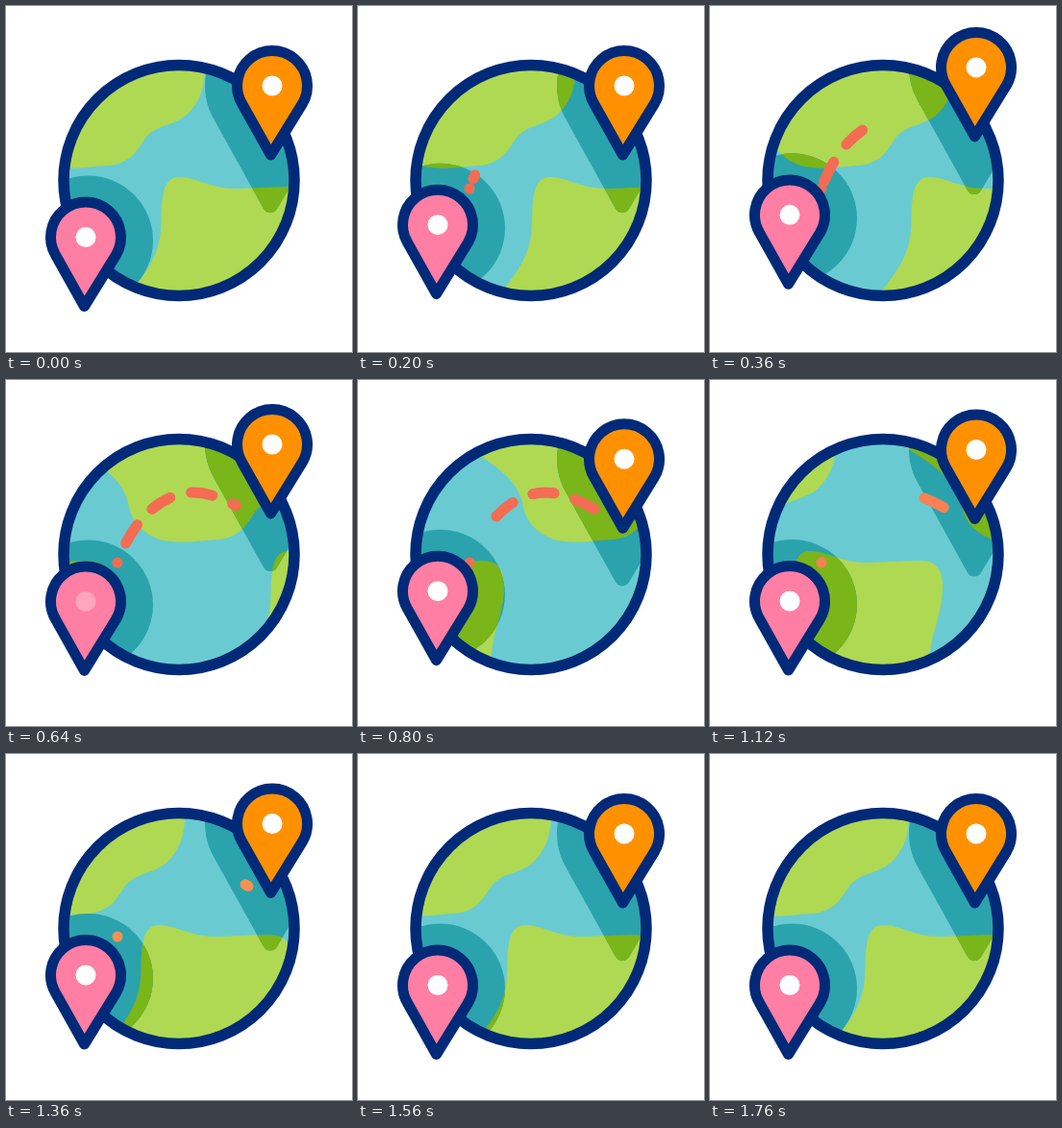
These frames come from a looping animation (360x360 px, 2 s). An HTML page:

```html
<!DOCTYPE html>
<html lang="en">
<head>
<meta charset="utf-8">
<title>Globe route</title>
<style>
  html, body { margin: 0; width: 100%; height: 100%; overflow: hidden; background: #fff; }
  svg { display: block; width: 100vw; height: 100vh; }
  .pin path { stroke: #002a78; stroke-width: 11; stroke-linejoin: round; }
</style>
</head>
<body>
<svg viewBox="0 0 360 360">
  <defs>
    <clipPath id="globe"><circle cx="180" cy="181.5" r="118"/></clipPath>
    <path id="north" d="M-70 55 L207 55 C208 80 204 98 188 113 C172 126 160 122 146 136 C136 150 132 162 108 166
      C92 166 70 172 46 166 C30 160 18 150 14 132 C10 108 -5 92 -70 55Z"/>
    <path id="south" d="M126 302 C140 285 160 262 161 232 C163 215 158 178 180 178 C198 178 212 190 240 190
      L290 188 C310 187 318 194 318 216 C317 250 304 262 304 302Z"/>
    <g id="land"><use href="#north"/><use href="#south"/></g>
    <g id="lands"><use class="land" href="#land"/><use class="land" href="#land"/></g>
    <path id="drop" d="M-31.5 18.5 A36.5 36.5 0 1 1 31.5 18.5 L-1.5 72Z"/>
    <clipPath id="shade">
      <circle class="pinkY" cx="2.5" cy="3.5" r="67.5"/>
      <path class="orangeY" d="M-60.6 35 A70 70 0 1 1 60.6 35 L5 128 A8 8 0 0 1 -9 128Z"/>
    </clipPath>
  </defs>

  <g clip-path="url(#globe)">
    <rect width="360" height="360" fill="#69cbd1"/>
    <use href="#lands" fill="#afd952"/>
    <g clip-path="url(#shade)">
      <rect width="360" height="360" fill="#2ba3ac"/>
      <use href="#lands" fill="#7ab51a"/>
    </g>
  </g>
  <circle cx="180" cy="181.5" r="120" fill="none" stroke="#002a78" stroke-width="11.5"/>
  <path id="trail" d="M116 190 C128 155 155 118 195 117 C215 117 235 128 252 137.5"
    fill="none" stroke-width="11" stroke-linecap="round"/>
  <g class="pin pinkY" fill="#ff7ea3"><path d="M-31.5 18.5 A36.5 36.5 0 1 1 31.5 18.5 L-1.5 72Z"/><circle id="pinkDot" r="10.5" fill="#fff"/></g>
  <g class="pin orangeY" fill="#ff9100"><path d="M-31.5 18.5 A36.5 36.5 0 1 1 31.5 18.5 L-1.5 72Z"/><circle r="10.5" fill="#fff"/></g>
</svg>
<script>
const LOOP = 2000, STEP = 40, TURN = 324, DASH = 22.5, PERIOD = 45;

// keys: [time, value]
const SPIN = [[0, 0], [360, 48], [640, 114], [800, 158], [1120, 248], [1360, 303], [1760, TURN]];
const FLOW = [[0, -68], [360, 8], [640, 67], [800, 101], [1120, 143], [1360, 172], [1440, 180]];
const HEAD = [[120, 0], [360, 80], [640, 161], [720, 180]];
const TAIL = [[560, 0], [640, 8], [800, 45], [1120, 130], [1360, 171], [1400, 180]];
const BLINK = [[560, 1], [640, 0.3], [720, 1]];

// hops: [start, end, height]
const PINK = [[150, 480, 25], [596, 928, 22], [1074, 1406, 22]];
const ORANGE = [[306, 684, 39], [684, 806, 4], [1074, 1406, 22]];

const all = sel => [...document.querySelectorAll(sel)];
const lands = all('.land'), pinkParts = all('.pinkY'), orangeParts = all('.orangeY');
const trail = document.getElementById('trail');
const pinkDot = document.getElementById('pinkDot');
const trailLen = trail.getTotalLength();

// Smooth monotone curve through the keys, flat at both ends
function curve(keys, t) {
  const last = keys.length - 1;
  if (t <= keys[0][0]) return keys[0][1];
  if (t >= keys[last][0]) return keys[last][1];
  const rate = i => (keys[i + 1][1] - keys[i][1]) / (keys[i + 1][0] - keys[i][0]);
  const slope = i => {
    if (i === 0 || i === last) return 0;
    const a = rate(i - 1), b = rate(i);
    return a * b > 0 ? 2 * a * b / (a + b) : 0;
  };
  const i = keys.findIndex(k => k[0] > t) - 1;
  const [t0, v0] = keys[i], [t1, v1] = keys[i + 1];
  const d = t1 - t0, u = (t - t0) / d, w = 1 - u;
  return v0 * (1 + 2 * u) * w * w + v1 * (3 - 2 * u) * u * u
    + d * u * w * (slope(i) * w - slope(i + 1) * u);
}

function lift(hops, t) {
  const hop = hops.find(([a, b]) => t >= a && t < b);
  if (!hop) return 0;
  const u = (t - hop[0]) / (hop[1] - hop[0]);
  return 4 * hop[2] * u * (1 - u);
}

const place = (parts, x, y) => parts.forEach(p => p.setAttribute('transform', `translate(${x} ${y})`));

function drawTrail(t) {
  const from = curve(TAIL, t), to = Math.min(curve(HEAD, t), trailLen);
  const flow = curve(FLOW, t);
  const dashes = [];
  let pos = 0;
  for (let s = flow - PERIOD * 8; s < trailLen; s += PERIOD) {
    const a = Math.max(s, from), b = Math.min(s + DASH, to);
    if (b <= a) continue;
    if (!dashes.length) dashes.push(0);
    dashes.push(a - pos, b - a);
    pos = b;
  }
  trail.style.display = dashes.length ? '' : 'none';
  trail.setAttribute('stroke-dasharray', [...dashes, 999].join(' '));
  const warm = Math.min(1, Math.max(0, (t - 800) / 560));
  trail.setAttribute('stroke', `rgb(${244 + 9 * warm} ${108 + 36 * warm} 83)`);
}

function draw(t) {
  const spin = curve(SPIN, t);
  place([lands[0]], spin, 0);
  place([lands[1]], spin - TURN, 0);
  place(pinkParts, 83, 240.5 - lift(PINK, t));
  place(orangeParts, 277, 83 - lift(ORANGE, t));
  pinkDot.setAttribute('opacity', curve(BLINK, t));
  drawTrail(t);
}

function tick() {
  const t = performance.now() % LOOP;
  draw(Math.floor(t / STEP) * STEP);
  requestAnimationFrame(tick);
}
tick();
</script>
</body>
</html>
```
